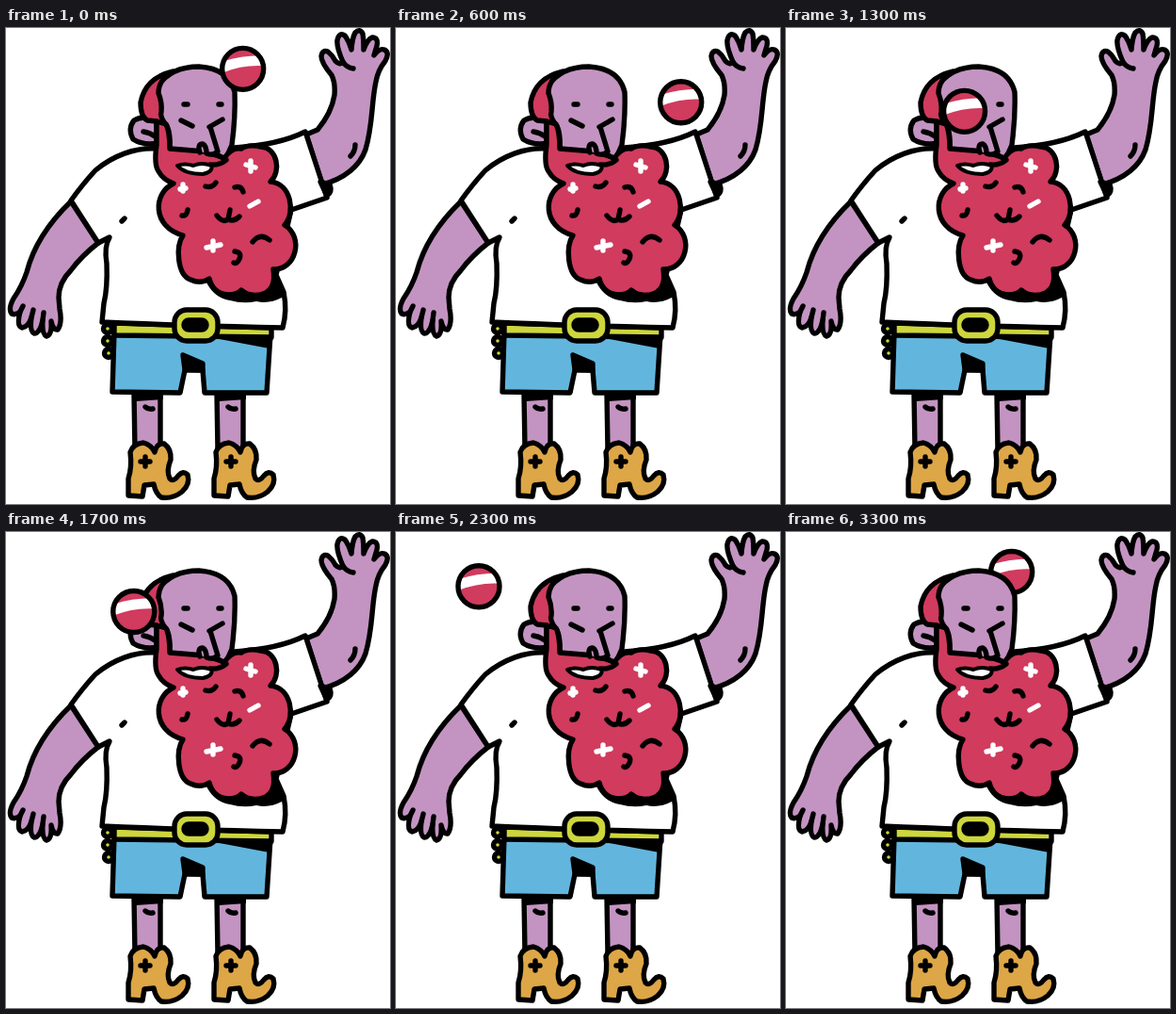
Recreate the animation shown at these times as an HTML page. Size 408x505 px, loop 3.4 s.

```html
<!DOCTYPE html>
<html lang="en">
<head>
<meta charset="utf-8">
<title>Waving man and orbiting ball</title>
<style>
  html, body { margin: 0; width: 100%; height: 100%; overflow: hidden; background: #fff; }
  svg { display: block; width: 408px; height: 505px; }
  .ink { stroke: #000; stroke-width: 5.4; stroke-linecap: round; stroke-linejoin: round; fill: none; }
  .skin { fill: #c394c1; }
  .red { fill: #d03b5e; }
  .white { fill: #fff; }
  .blue { fill: #62b6dd; }
  .lime { fill: #cdd63c; }
  .tan { fill: #dda647; }
  .black { fill: #000; }
  .shine { stroke: #fff; }
</style>
</head>
<body>
<svg id="stage" viewBox="0 0 408 505">
  <defs>
    <clipPath id="disc"><circle r="21.5"/></clipPath>
    <g id="leg">
      <path class="skin" d="M136 388L137 448H164V388Z"/>
      <path class="black" stroke="none" d="M136 388H167V394L138 396Z"/>
      <path d="M148 402Q151 405 156 404"/>
    </g>
    <g id="boot">
      <path class="tan" d="M132 450Q135 441 146 440Q154 442 158 450Q160 440 168 441Q176 447 175 458Q170 470 174 478Q178 482 183 475Q188 469 193 474Q196 484 187 492Q177 500 165 498Q159 494 157 484L147 485L145 497L130 496L130 478Q134 466 132 450Z"/>
      <path d="M148 455V465M143 460H153"/>
    </g>
  </defs>

  <g id="man" class="ink">
    <!-- arms -->
    <path class="skin" d="M319 113L331 108Q346 90 349 71Q350 58 346 50Q335 37 335 30Q336 23 342 25Q347 29 350 35Q355 40 358 36Q351 20 352 13Q354 4 360 8Q364 13 367 23Q368 10 371 5Q376 0 379 6Q380 12 380 23Q384 12 389 10Q396 10 394 19L391 29Q397 21 402 23Q408 26 403 35Q395 45 393 57C388 80 390 102 382 129C376 146 360 160 336 166Z"/>
    <path d="M358 36Q362 42 369 43M371 124Q371 131 366 136"/>
    <path class="skin" d="M69 184C44 208 29 232 22 259Q17 274 8 287Q2 298 6 303Q10 305 15 301Q11 316 17 318Q24 317 27 307Q25 322 30 324Q36 324 39 310Q38 325 43 327Q49 326 48 311Q50 321 55 320Q60 313 57 298L56 286Q56 270 69 257Q80 242 98 228Z"/>
    <path d="M18 295L15 301M29 299L27 307M40 302L39 310"/>

    <use href="#leg"/>
    <use href="#leg" x="88"/>
    <use href="#boot"/>
    <use href="#boot" x="91"/>

    <!-- shorts and belt -->
    <g class="lime">
      <circle cx="108" cy="319" r="4.5"/><circle cx="108" cy="332" r="4.5"/><circle cx="109" cy="345" r="4.5"/>
    </g>
    <path class="blue" d="M115 322L281 324L277 387H211L209 363H190L185 387L113 386Z"/>
    <path class="black" d="M188 347L209 356V363L190 362Z"/>
    <path class="black" d="M226 327L281 329L279 337Z"/>
    <path class="lime" d="M115 313L282 318V328L115 326Z"/>

    <!-- shirt -->
    <path class="white" d="M162 128C137 126 113 136 95 151Q82 165 69 183L98 228L110 222Q104 232 107 250Q108 276 104 292L102 312Q190 316 294 318Q299 300 295 280L287 262L303 193L341 180L318 110Q290 124 243 127Z"/>
    <path d="M123 205L126 202"/>
    <path class="black" d="M334 163L341 178Q347 174 344 166Z"/>
    <path class="black" stroke="none" d="M213 270Q222 287 238 289Q252 293 266 290Q280 293 293 286Q296 274 284 260Z"/>
    <rect class="lime" x="179" y="299" width="46" height="33" rx="13"/>
    <rect class="black" x="189" y="310" width="24" height="10" rx="5"/>

    <!-- head -->
    <path class="skin" d="M161 98Q146 92 136 98Q129 107 135 118Q146 125 162 122Z"/>
    <path d="M146 110Q153 111 158 115"/>
    <path class="skin" d="M162 135L161 62Q175 41 205 41Q237 43 243 68Q244 94 240 124L232 142Z"/>
    <path class="red" d="M177 46Q148 53 143 79Q143 94 150 98L160 99V130H174Q175 112 171 104Q163 94 165 89Q166 79 162 69Q162 55 177 46Z"/>
    <path d="M189 81L193 81M226 81L229 81M186 98L198 104M230 97L216 105"/>

    <!-- beard -->
    <path class="red" d="M160 99V124Q157 145 162 152Q167 161 178 165C156 175 155 211 188 220C180 232 182 262 196 267Q207 272 216 266Q220 282 236 283Q246 283 250 278Q257 285 270 283Q288 279 284 256C308 257 317 222 296 209C308 196 303 165 281 163C293 152 288 127 271 126Q257 123 250 128Q240 126 232 138L211 131L174 128Q174 110 170 102Z"/>
    <path class="skin" stroke="none" d="M206 131L209 122L217 106L226 130L220 135Z"/>
    <path d="M206 132Q203 123 209 123Q213 125 213 133Q220 136 225 131L217 105M224 134L234 140Q227 146 217 145"/>
    <path class="white" stroke-width="4" d="M182 146Q190 143 199 146Q208 142 218 146Q221 152 209 155Q190 155 182 146Z"/>
    <path d="M212 168Q219 170 223 164M243 169Q250 167 252 174M187 199Q192 200 193 193M224 199Q230 207 236 203Q242 206 248 200M236 203L238 193M243 237Q251 238 248 245Q245 251 242 249M262 227Q270 217 280 225"/>
    <path class="shine" d="M260 141V152M255 145L265 148M188 166V173M185 171L191 170M220 226V236M213 233L228 230M259 189L268 184"/>
  </g>

  <g id="ball">
    <circle class="red" r="22"/>
    <path class="white" clip-path="url(#disc)" d="M-24 -7Q0 -15 24 -14V-3Q0 -5 -24 5Z"/>
    <circle class="ink" r="22"/>
  </g>
</svg>
<script>
  const stage = document.getElementById('stage');
  const man = document.getElementById('man');
  const ball = document.getElementById('ball');
  const LOOP = 3400, STEP = 100, BEHIND_FROM = 2400;
  // [time in ms, orbit angle in degrees]
  const keys = [[0, -67], [600, 36], [1000, 74], [1200, 90], [1700, 124], [1800, 134],
    [2300, 198], [2400, 212], [2800, 244], [3000, 260], [3300, 287], [3400, 293]];

  function angleAt(time) {
    const i = keys.findIndex(([t]) => t > time);
    const [t0, a0] = keys[i - 1], [t1, a1] = keys[i];
    return (a0 + (a1 - a0) * (time - t0) / (t1 - t0)) * Math.PI / 180;
  }

  let wasFront = true;
  function draw(now) {
    const time = Math.floor(now % LOOP / STEP) * STEP;
    const angle = angleAt(time);
    const x = 204 + 122 * Math.cos(angle), y = 65 + 23.5 * Math.sin(angle);
    ball.setAttribute('transform', `translate(${x} ${y})`);
    const front = time < BEHIND_FROM;
    if (front !== wasFront) stage.insertBefore(ball, front ? null : man);
    wasFront = front;
  }

  const start = performance.now();
  function tick() {
    draw(performance.now() - start);
    requestAnimationFrame(tick);
  }
  tick();
</script>
</body>
</html>
```
